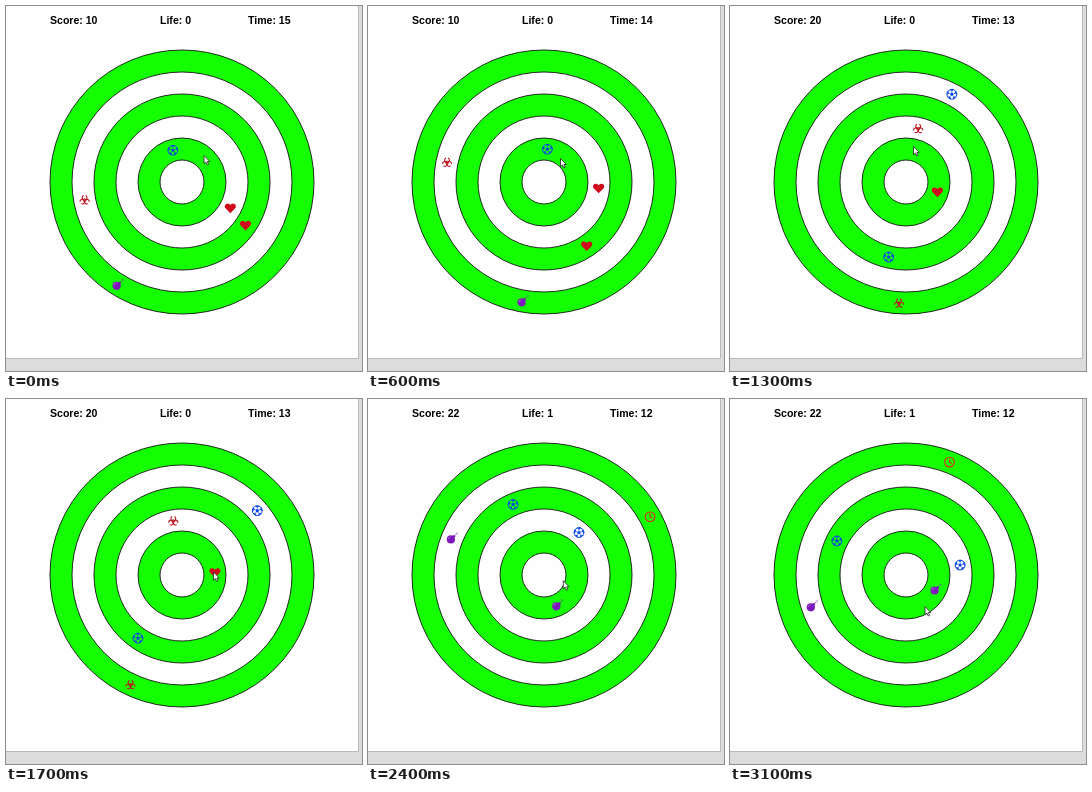
Recreate the animation shown at these times as an HTML page. Size 356 px wide and 365 px high, loop 3.2 s.

```html
<!DOCTYPE html>
<html lang="en">
<head>
<meta charset="utf-8">
<title>Ring game</title>
<style>
  html, body { margin: 0; width: 100%; height: 100%; overflow: hidden; background: #dcdcdc; }
  svg { display: block; width: 356px; height: 365px; }
  text { font: bold 10.56px "Liberation Sans", Arial, sans-serif; }
</style>
</head>
<body>
<svg viewBox="0 0 356 365">
  <defs>
    <g id="heart">
      <path d="M0 5 -4.8.1C-6.2-1.5-5.6-4.4-3.2-4.6-1.7-4.8-.6-4 0-3 .6-4 1.7-4.8 3.2-4.6 5.6-4.4 6.2-1.5 4.8.1Z" fill="#cf0a1c"/>
    </g>
    <g id="ball" fill="#0b48e6" stroke="#0b48e6">
      <circle r="4.9" fill="none" stroke-width="1"/>
      <path d="M0-1.9 1.8-.6 1.1 1.5H-1.1L-1.8-.6Z" stroke="none"/>
      <g id="patches" stroke-width=".5"></g>
    </g>
    <g id="bomb" fill="#7d17bd">
      <circle cx="-1.2" cy="1.2" r="4.1"/>
      <path d="M.6-2 2-3.4 3.5-1.9 2.1-.5Z"/>
      <path d="M2.6-2.6 4-4M4.2-5.6V-4.8M5.7-4.1H5M5.4-5.4 4.9-4.9" fill="none" stroke="#7d17bd" stroke-width=".8"/>
      <path d="M-3.8.9A2.7 2.7 0 0 1-1.6-1.4" fill="none" stroke="#c79be0" stroke-width=".6"/>
    </g>
    <g id="hazard" fill="none" stroke="#bd1420" stroke-width="1.1"></g>
    <g id="clock" fill="none" stroke="#e0201c" stroke-width="1.1">
      <circle r="4.8"/>
      <path d="M0-3.2V.2L2.2 1.5"/>
    </g>
  </defs>
  <path d="M0 0H352.5V352.5H0Z" fill="#fefefe" stroke="#b9b9b9"/>
  <path d="M-1-1H352V352H-1Z" fill="#fefefe"/>
  <g id="rings" stroke="#111" stroke-width=".9"></g>
  <text id="score" x="44" y="17.6"></text>
  <text id="life" x="154" y="17.6"></text>
  <text id="time" x="242" y="17.6"></text>
  <g id="items"></g>
  <path id="cursor" d="M0 0V8.2L1.9 6.5 3.2 9.4 4.6 8.8 3.3 6H5.8Z" fill="#fff" stroke="#222" stroke-width=".8"/>
</svg>
<script>
const LOOP = 3200, STEP = 100, CENTER = 176, UNIT = 22, RAD = Math.PI / 180;
const byId = id => document.getElementById(id);

function add(parent, tag, attrs) {
  const node = document.createElementNS('http://www.w3.org/2000/svg', tag);
  for (const key in attrs) node.setAttribute(key, attrs[key]);
  return parent.appendChild(node);
}

for (let i = 6; i > 0; i--) {
  add(byId('rings'), 'circle', { cx: CENTER, cy: CENTER, r: i * UNIT, fill: i % 2 ? '#fefefe' : '#14ff00' });
}
for (let i = 0; i < 5; i++) {
  add(byId('patches'), 'path', {
    d: 'M0-1.8V-3.4M-1.7-4.7 0-3.1 1.7-4.7Z', transform: `rotate(${i * 72})`
  });
}
add(byId('hazard'), 'circle', { r: 1.5, cy: .5, 'stroke-width': .8 });
for (const turn of [0, 120, 240]) {
  add(byId('hazard'), 'path', {
    d: 'M-1.1-4.7A2.4 2.4 0 1 0 1.1-4.7', transform: `translate(0 .6) rotate(${turn})`
  });
}

// Each item, from the inner lane outwards: shape, angle at time "at", direction.
const rounds = [
  { start: 0, at: 0, speed: .0365, score: 10, life: 0, items: [
    ['ball', -106, 1], ['heart', 28.5, -1], ['heart', 34.4, 1], ['hazard', 169.7, 1], ['bomb', 122, -1]] },
  { start: 1000, at: 1300, speed: .0547, score: 20, life: 0, items: [
    ['heart', 18, -1], ['hazard', -77.2, -1], ['ball', 103, 1], ['ball', -62.4, 1], ['hazard', 93.3, 1]] },
  { start: 1800, at: 2100, speed: .0573, score: 22, life: 1, items: [
    ['bomb', 83, -1], ['ball', -67.7, 1], ['ball', -96.5, -1], ['bomb', 219, -1], ['clock', -11.6, -1]] }
];

const countdown = [[0, 15], [200, 14], [1200, 13], [2200, 12]];

const cursorPath = [
  [0, 198, 149.5], [600, 192.5, 152.5], [900, 184, 141], [1300, 183.5, 140.5],
  [1700, 207.5, 173], [1800, 207.5, 173], [2100, 192, 186], [2700, 198.5, 177.5], [3100, 195, 207.5]
];

const sprites = rounds[0].items.map(() => add(byId('items'), 'use', {}));

function cursorAt(t) {
  const i = Math.max(1, cursorPath.findIndex(p => p[0] >= t));
  const [t0, x0, y0] = cursorPath[i - 1], [t1, x1, y1] = cursorPath[i];
  const k = (t - t0) / (t1 - t0);
  return [x0 + (x1 - x0) * k, y0 + (y1 - y0) * k];
}

function draw(t) {
  const round = rounds.filter(r => r.start <= t).pop();
  byId('score').textContent = `Score: ${round.score}`;
  byId('life').textContent = `Life: ${round.life}`;
  byId('time').textContent = `Time: ${countdown.filter(c => c[0] <= t).pop()[1]}`;
  round.items.forEach(([shape, degrees, dir], lane) => {
    const angle = (degrees + dir * round.speed * (t - round.at)) * RAD;
    const radius = (lane + 1.5) * UNIT;
    const x = CENTER + radius * Math.cos(angle), y = CENTER + radius * Math.sin(angle);
    sprites[lane].setAttribute('href', '#' + shape);
    sprites[lane].setAttribute('transform', `translate(${x.toFixed(2)} ${y.toFixed(2)})`);
  });
  byId('cursor').setAttribute('transform', `translate(${cursorAt(t)})`);
}

const begin = performance.now();
function tick() {
  const t = Math.max(0, performance.now() - begin) % LOOP;
  draw(Math.floor(t / STEP) * STEP);
  requestAnimationFrame(tick);
}
tick();
</script>
</body>
</html>
```
